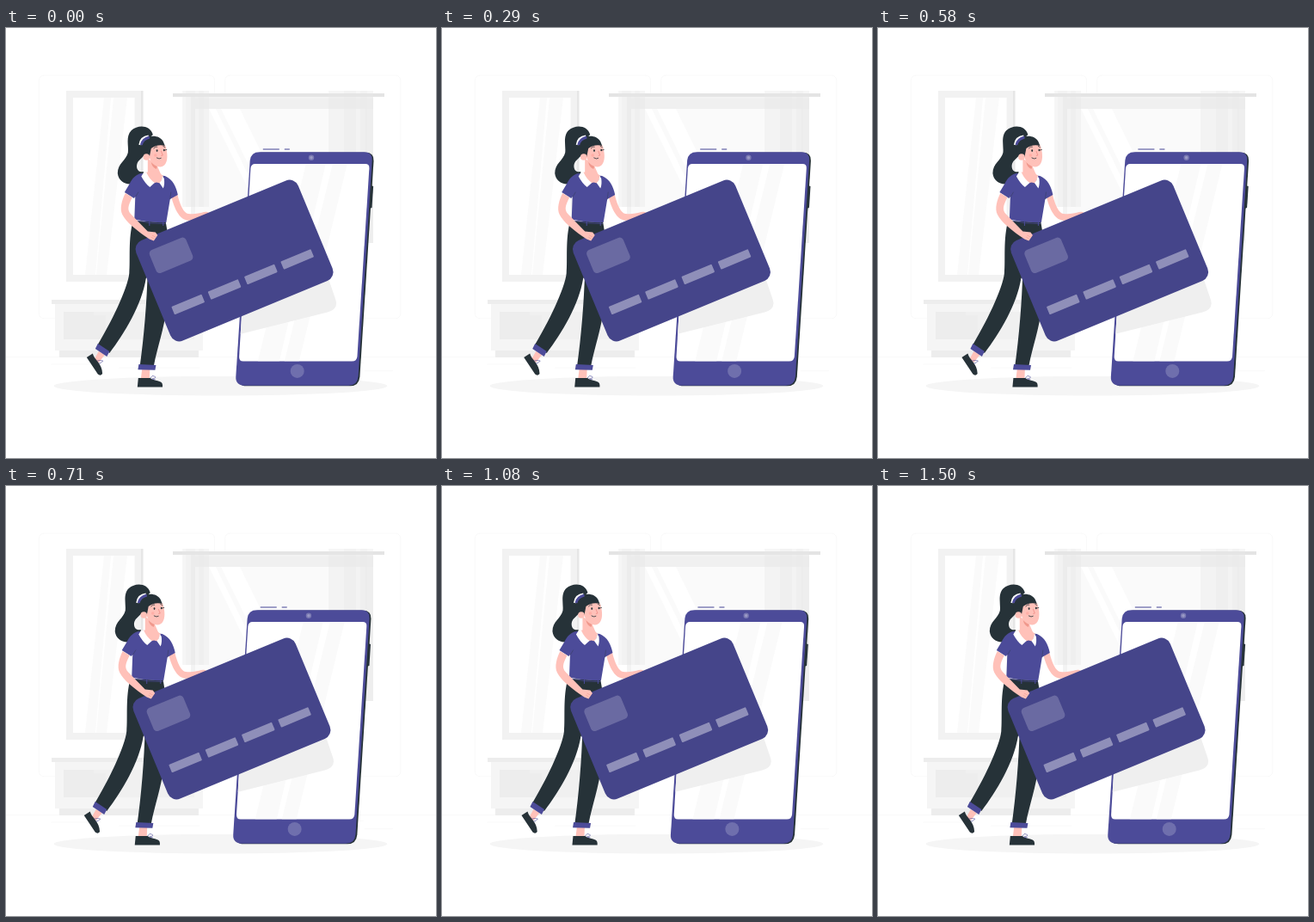
These frames come from a looping animation (500x500 px, 1540 ms). An HTML page:

```html
<!DOCTYPE html>
<html lang="en">
<head>
<meta charset="utf-8">
<title>Card payment</title>
<style>
  html, body { margin: 0; width: 100%; height: 100%; overflow: hidden; background: #fff; }
  svg { display: block; width: 100vw; height: 100vh; }
  .main { fill: #4c4b99; }
  .dark { fill: #263238; }
  .skin { fill: #ffc1b9; }
  .arm { fill: none; stroke: #ffc1b9; stroke-width: 7.5; stroke-linecap: round; }
  .line { fill: none; stroke: #263238; stroke-width: .8; stroke-linecap: round; }
  .lace { fill: none; stroke: #4c4b99; stroke-width: .6; }
</style>
</head>
<body>
<svg viewBox="0 0 500 500">
  <defs>
    <path id="body" d="M295 144.200H416.500Q426.500 144.200 425.900 154L409.800 405Q408.800 415.800 398.500 415.800H278Q266.800 415.800 267.500 405L283.900 154Q285 144.200 295 144.200Z"/>
    <path id="screen" d="M290 158H418Q422.900 158 422.600 163L408.600 382Q408.100 387.500 402.500 387.500H276Q271 387.500 271.300 382L284.600 163.500Q285 158 290 158Z"/>
    <clipPath id="glass"><use href="#screen"/></clipPath>
    <rect id="digits" x="-88.200" y="21.500" width="38" height="10" rx="1"/>
  </defs>

  <g id="room">
    <g fill="none" stroke="#ebebeb" stroke-width=".3">
      <rect x="38.300" y="55.100" width="204.200" height="282.600" rx="5.700"/>
      <rect x="254.600" y="55.100" width="204.200" height="282.600" rx="5.700"/>
      <path d="M0 382.500H500M416.800 398.600h33M322.500 401.300h8.700M396.600 389.300h19.200M52.500 391h43.200M104.600 391h6.300M131.500 395.200h93.700"/>
    </g>

    <path fill="#e6e6e6" d="M70 73H159.500V295H70Z"/>
    <path fill="#f2f2f2" d="M70 73H157V295H70Z"/>
    <path fill="#fff" d="M78 81H149.500V287H78Z"/>
    <path fill="#fafafa" d="M114 81h8l-18 206h-12ZM125 81h16l-24 206h-12Z"/>

    <path fill="#f5f5f5" d="M57 320H229V375H57Z"/>
    <path fill="#f0f0f0" d="M67 330H219V362H67Z"/>
    <path fill="#ebebeb" d="M67 330H102V334H116V362H67Z" opacity=".6"/>
    <path fill="#ededed" d="M53 316H229V321H53ZM62 375H224V383H62Z"/>

    <path fill="#f3f3f3" d="M215 80H427V250H215Z"/>
    <path fill="#f0f0f0" d="M220 82H427V94H220Z"/>
    <path fill="#fafafa" d="M220 94H418V250H220Z"/>
    <path fill="#fff" d="M236 94h8l55 112h-8ZM250 94h22l55 112h-22Z"/>
    <path fill="#e4e4e4" d="M194 76H440V80H194Z"/>
    <g fill="#e6e6e6" opacity=".65">
      <path d="M205 73H236V208H205ZM375 73H427V250H375Z" opacity=".55"/>
      <path d="M209 73H220V208H209ZM224 73H230V208H224ZM393 73H407V250H393ZM412 73H420V250H412Z" opacity=".6"/>
    </g>

    <ellipse cx="249.500" cy="416.200" rx="193.900" ry="11.300" fill="#f5f5f5"/>
  </g>

  <g id="scene">
    <g id="phone">
      <use href="#body" class="dark" x="1.800" y=".5"/>
      <path class="dark" d="M424 183l3.300 1-1.600 25-3.300 1Z"/>
      <use href="#body" class="main"/>
      <use href="#screen" fill="#fff"/>
      <g clip-path="url(#glass)">
        <path fill="#fafafa" d="M349 158h23l-54 229.500h-25ZM380 158h17l-56 229.500h-17Z"/>
        <path fill="#efefef" d="M260 359L374 330.500Q387 327 383.500 316L373 285 250 330Z"/>
      </g>
      <circle cx="355.200" cy="150.800" r="3.200" fill="#fff" opacity=".25"/>
      <circle cx="355.200" cy="150.800" r="1.700" fill="#fff" opacity=".25"/>
      <circle cx="338.900" cy="398.900" r="8" fill="#fff" opacity=".2"/>
      <path d="M299 141h19M324 141h6" fill="none" stroke="#4c4b99" stroke-width="1.300" opacity=".7"/>
    </g>

    <g id="legs">
      <path class="skin" d="M108 376l7 4-7 9-5-4ZM158.500 396h9l-.5 12h-10Z"/>
      <path class="dark" d="M148 224C142 245 145 270 143.500 285 142 303 121 345 107 368L120.500 378C138 355 158 322 163 291L192 262 186 226Z"/>
      <path class="dark" d="M165 280C164 320 160.500 360 156 392L172 393C176 372 184 350 187 325L192 260 165 240Z"/>
      <path class="main" d="M107 367l13.500 9-3 6-13.500-9ZM154.600 391l20 1-1 5.800-20-.5Z"/>
      <path class="dark" d="M94 383L101 378.500C103 386 112 390 112.300 402Q110 405 107 402.500Z"/>
      <path class="dark" d="M154 407H168C172 411 182 409 182.200 415V417.500H153Z"/>
      <path class="lace" d="M106 387q4-1 7 0-2 3-5 3M168 407q2-4 5-2t-3 3l4 1"/>
    </g>

    <path id="hair" class="dark" d="M171 124C168 113 154 112 146 119 139 126 143 137 142 145 140 154 130 157 130 169 131 178 139 183 148 181 157 180 161 173 160 167 153 169 150 161 154 155L161 148 165 130Z"/>

    <g id="head">
      <path class="skin" d="M165 152V168L171 181 182 174 175 158Z"/>
      <path fill="#f0988c" d="M169 156l7 5-1 3q-5-2-6-8Z"/>
      <path class="skin" d="M167 138C174 133 183 133 186 138 188 146 188.500 153 185.500 158 182.500 163 176 162 171 158 167 154 165 145 167 138Z"/>
      <path class="dark" d="M159 134C162 124 178 123 183 132L185 137C179 135 173 137 169 140L167 150 160 149C156 143 157 138 159 134Z"/>
      <circle class="skin" cx="163.500" cy="150" r="3.800"/>
      <path d="M156 136Q157 127 166 126" fill="none" stroke="#fff" stroke-width="3"/>
      <path d="M157.500 136Q159 129 167 127" fill="none" stroke="#4c4b99" stroke-width="3"/>
      <ellipse class="dark" cx="175.800" cy="142.600" rx=".9" ry="1.300"/>
      <ellipse class="dark" cx="184" cy="142" rx=".9" ry="1.300"/>
      <path class="line" d="M172 140q2-3 4-2M183 137.500l2 1M185 142l2-.5M175.500 151q3 2 5 .4"/>
      <path d="M180.500 143l2 5-2 .5" fill="none" stroke="#ed847e" stroke-width=".7"/>
      <circle cx="174" cy="148" r="1.800" fill="#ff9d96" opacity=".5"/>
    </g>

    <g id="torso">
      <path class="arm" d="M196 195C199 207 203 217 210 219.500 216 221 224 219 233 217.500"/>
      <path class="main" d="M158 169C151 170 147 175 144 181L138 191 149 198 150.500 196 149.500 222.500Q168 227 186.500 226L191 199 200 194C198 184 194 176 185 172Z"/>
      <path class="skin" d="M162 168L168 179 174 181 180 180 183 172 175 166Z"/>
      <path class="main" d="M167.500 185.500Q171 179.500 175.500 179.500 180 180 183 187Z"/>
      <path fill="#fff" d="M160 168.500l-2.500 4Q162 181 167.500 185L173 180Q167 176 163.500 168ZM182 172l2 3Q185 182 183 186.500L178.500 180Q182 177 182 172Z"/>
      <path fill="none" stroke="#4c4b99" d="M152 224q16 4 34 3.500" stroke-width=".7"/>
      <path fill="none" stroke="#4c4b99" d="M167 225v5M183 226v4" stroke-width="1"/>
      <path class="line" d="M151 196l3-5M191 199l1-8" opacity=".4"/>
    </g>

    <g id="card" transform="translate(265.700 270.500) rotate(-22.500)">
      <rect x="-102" y="-63" width="204" height="126" rx="11" fill="#45458a"/>
      <rect x="-88.500" y="-48.200" width="46" height="28.700" rx="4.500" fill="#fff" opacity=".2"/>
      <g fill="#fff" opacity=".4">
        <use href="#digits"/>
        <use href="#digits" x="45.800"/>
        <use href="#digits" x="91.600"/>
        <use href="#digits" x="137.400"/>
      </g>
    </g>

    <g id="near-arm">
      <path class="skin" d="M139 192L147 197C142 207 141 211 145 216L165 236.500 174 237.500 176.500 241 172 247.500 167 245.500 161 241.500C151 234 140 226 135.500 217 132 210 135 200 139 192Z"/>
      <path d="M170 241l4 2M169 243l3 2" fill="none" stroke="#ed9a90" stroke-width=".6"/>
    </g>
  </g>
</svg>
<script>
  const LOOP = 1540, SHAKE = 1500, FPS = 24, LEAD = 28;
  const offsets = [0, -1, 2, -4, 4, -4, 4, -4, 2, -1, 0];
  const scene = document.getElementById('scene');

  // Linear shake through evenly spaced horizontal offsets
  function shake(ms) {
    const pos = (ms % SHAKE) / SHAKE * 10, i = Math.floor(pos);
    return offsets[i] + (offsets[i + 1] - offsets[i]) * (pos - i);
  }

  function draw() {
    const step = Math.floor((performance.now() % LOOP + 5) * FPS / 1000) % 37;
    const x = shake(step * 1000 / FPS + LEAD);
    scene.setAttribute('transform', `translate(${x.toFixed(3)} 0)`);
    requestAnimationFrame(draw);
  }
  draw();
</script>
</body>
</html>
```
